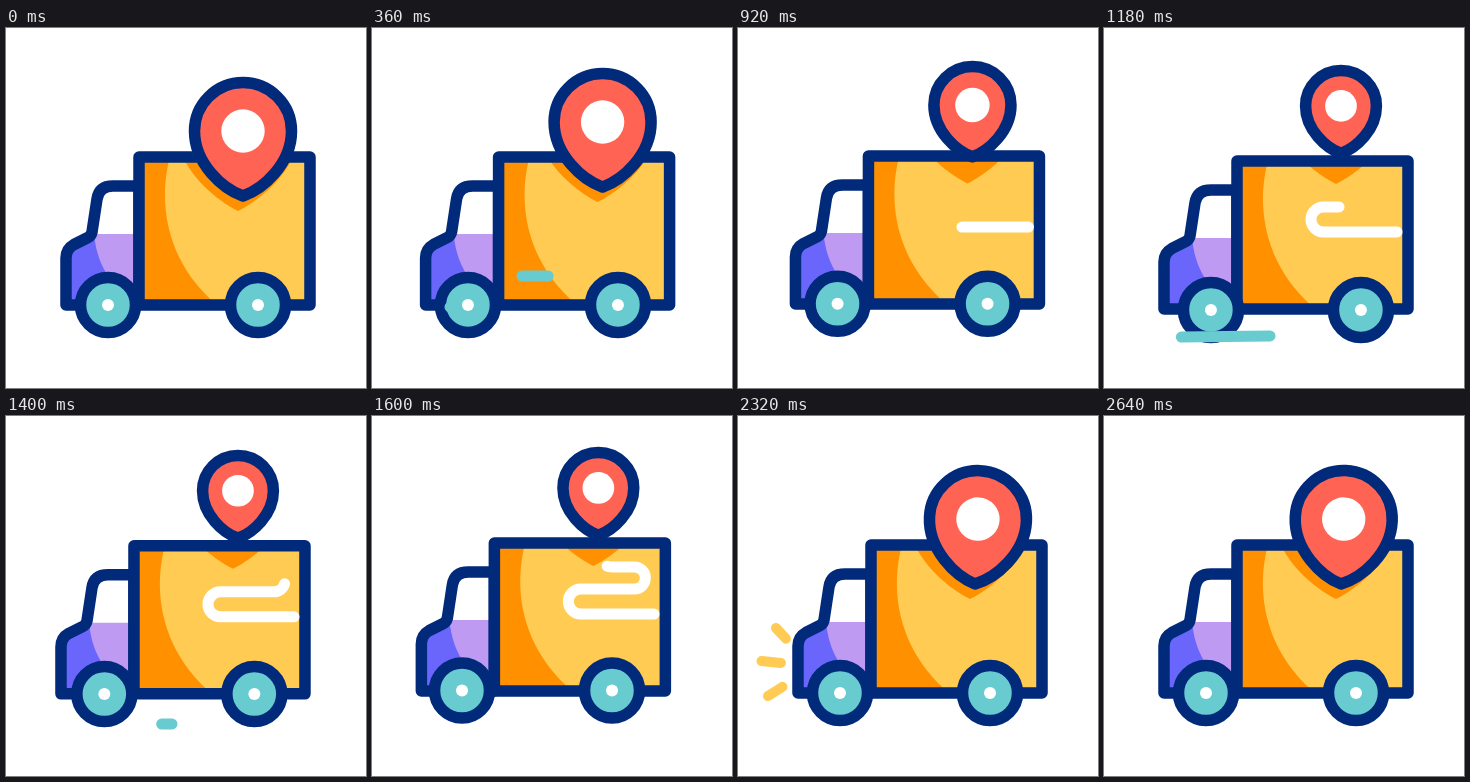
Write an HTML page that moves like this. It is 360 px wide and 360 px high and loops after 2660 ms.

```html
<!DOCTYPE html>
<html lang="en">
<head>
<meta charset="utf-8">
<title>Delivery truck</title>
<style>
html, body { margin: 0; width: 100%; height: 100%; overflow: hidden; background: #fff; }
svg { display: block; width: 100%; height: 100%; }
.line { stroke: #022a7b; stroke-width: 11.5; stroke-linejoin: round; stroke-linecap: round; }
.trail { fill: none; stroke-width: 11; stroke-linejoin: round; stroke-linecap: round; }
.wind { stroke: #67cbd0; }
.ray { stroke: #ffcb52; stroke-width: 10; }
</style>
</head>
<body>
<svg viewBox="0 0 360 360">
  <defs>
    <path id="cab" d="M133 158H107Q93 158 91 171L86 204Q85 208 82 209.500L68 216.500Q60 221 60 230V277H133Z"/>
    <clipPath id="inCab"><use href="#cab"/></clipPath>
    <clipPath id="inBox"><path d="M133 129H304V277H133Z"/></clipPath>
    <g id="wheel">
      <circle class="line" r="27.5" fill="#67cbd0"/>
      <circle r="6" fill="#fff"/>
    </g>
  </defs>
  <g id="body">
    <g clip-path="url(#inCab)">
      <path d="M55 206H140V280H55Z" fill="#bf9af3"/>
      <path d="M55 206H88C90 225 96 245 114 262V280H55Z" fill="#6b66fb"/>
    </g>
    <use href="#cab" class="line" fill="none"/>
    <g clip-path="url(#inBox)">
      <path d="M133 129H304V277H133Z" fill="#ffcb52"/>
      <path d="M164 129C154 165 154 228 211 277H133V129Z" fill="#ff9100"/>
      <path id="shade" d="M0 0C-18 -9 -42 -28 -54 -52V-90H54V-52C42 -28 18 -9 0 0Z" fill="#ff9100"/>
    </g>
    <path class="line" d="M133 129H304V277H133Z" fill="none"/>
  </g>
  <g id="wheels">
    <use href="#wheel" x="102" y="277"/>
    <use href="#wheel" x="252" y="277"/>
  </g>
  <path class="trail wind" d="M150 248H236"/>
  <path class="trail wind" d="M78 279L166 277"/>
  <path class="trail wind" d="M77 309L166 308"/>
  <g id="top">
    <path id="route" class="trail" stroke="#fff" d="M293 200H219.500A12.500 12.500 0 0 1 219.500 175H273A11 11 0 0 0 273 153H252Q237 153 237 138"/>
    <g id="pin">
      <path id="drop" class="line" fill="#ff6353" d="M0 0C-20 -7 -48.5 -32 -48.5 -65A48.5 48.5 0 0 1 48.5 -65C48.5 -32 20 -7 0 0Z"/>
      <circle cy="-65" r="21.7" fill="#fff"/>
    </g>
  </g>
  <path class="trail ray" d="M51 226L38 212"/>
  <path class="trail ray" d="M49 247.500L23.500 245"/>
  <path class="trail ray" d="M49 268L30 280"/>
</svg>
<script>
const LOOP = 2660, CYCLE = 1080;
const $ = id => document.getElementById(id);
const ramp = (t, from, to) => Math.min(1, Math.max(0, (t - from) / (to - from)));
const ease = (t, from, to) => {
  const p = ramp(t, from, to);
  return p * p * (3 - 2 * p);
};
const move = (el, x, y, more = '') => el.setAttribute('transform', `translate(${x} ${y})${more}`);

const winds = [...document.querySelectorAll('.wind')];
const rays = [...document.querySelectorAll('.ray')];
const windStart = [285, 350, 930];

// The head of a path runs from start to full, then its tail follows until end
function sweep(path, t, start, full, leave, end) {
  const len = path.getTotalLength();
  const head = ramp(t, start, full) * len, tail = ramp(t, leave, end) * len;
  path.style.visibility = head > tail ? 'visible' : 'hidden';
  path.style.strokeDasharray = `${head - tail} ${len * 2}`;
  path.style.strokeDashoffset = -tail;
}

// The truck dips, drives forward and rolls back, twice per loop
function drive(t) {
  const u = t < 2 * CYCLE ? t % CYCLE / CYCLE : 0;
  const x = 11 * (ease(u, .53, 1) - ease(u, .09, .53));
  const y = 4 * ease(u, 0, .1) - 6 * ease(u, .1, .48) + 2 * ease(u, .7, 1);
  const roll = 5 * ease(u, 0, .1) - 17 * ease(u, .1, .49) + 12 * ease(u, .49, 1);
  move($('body'), x, y);
  move($('top'), x, y);
  move($('wheels'), roll, y * 1.25);
}

// The pin lifts and shrinks, then drops back at full size and wobbles
function hover(t) {
  const fall = ease(t, 2170, 2300);
  const lift = ease(t, 0, 540) - fall;
  const small = ease(t, 580, 1080) - fall;
  const windup = ease(t, 1920, 2170) - fall;
  const tilt = t > 2300 ? 5 * Math.sin((t - 2300) / 240 * 2 * Math.PI) : 0;
  const size = 1 - .27 * small;
  move($('pin'), 237, 168 - 12 * lift - 34.6 * small - 5 * windup, ` rotate(${tilt}) scale(${size})`);
  move($('shade'), 232, 183 - 12 * lift - 19 * small);
  $('drop').style.strokeWidth = 11.5 / size;
}

function draw(t) {
  drive(t);
  hover(t);
  sweep($('route'), t, 640, 1680, 1600, 2210);
  winds.forEach((w, i) => {
    const s = windStart[i];
    sweep(w, t, s, s + 250, s + 250, s + 500);
  });
  rays.forEach(r => sweep(r, t, 2200, 2310, 2290, 2420));
}

function frame() {
  draw(performance.now() % LOOP);
  requestAnimationFrame(frame);
}
frame();
</script>
</body>
</html>
```
